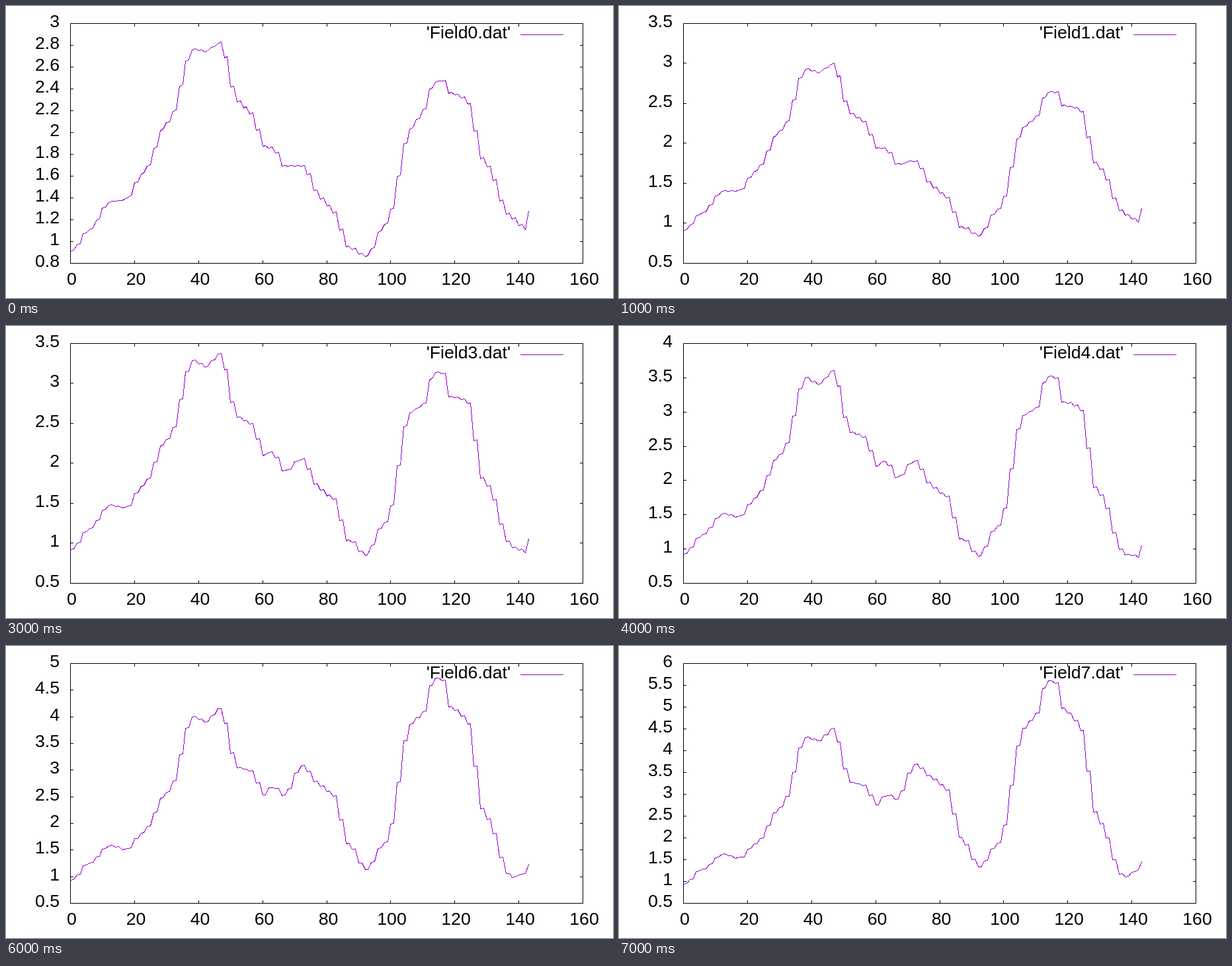
These frames come from a looping animation (918 px wide and 442 px high, 8000 ms). An HTML page:

```html
<!DOCTYPE html>
<html lang="en">
<head>
<meta charset="utf-8">
<title>Field plot</title>
<style>
html, body { margin: 0; width: 100%; height: 100%; overflow: hidden; background: #fff; }
svg { display: block; }
path { fill: none; stroke: #000; shape-rendering: crispEdges; }
.curve { stroke: #9400d3; }
text { font: 26.67px "Liberation Sans", Arial, sans-serif; fill: #000; }
.end { text-anchor: end; }
.mid { text-anchor: middle; }
</style>
</head>
<body>
<svg id="plot" width="918" height="442" viewBox="0 0 918 442"></svg>
<script>
const STEP = 1000, STEPS = 8, LAST = STEPS - 1;
const SAMPLES = 144;
const BOX = { left: 97, right: 872, top: 26, bottom: 389 };

// Plateaus of the profile: x, level at the first step, level at the last
const KEYS = [
  [0, .91, .94], [5, 1.09, 1.26], [12, 1.36, 1.62], [17, 1.38, 1.52],
  [22, 1.62, 1.86], [30, 2.09, 2.7], [38, 2.76, 4.31], [42, 2.74, 4.22],
  [46, 2.82, 4.5], [52, 2.28, 3.27], [56, 2.17, 3.2], [60, 1.87, 2.75],
  [63, 1.85, 3], [66, 1.69, 2.88], [72, 1.69, 3.68], [78, 1.39, 3.34],
  [82, 1.26, 3.09], [86, .95, 2.01], [92, .86, 1.33], [98, 1.16, 1.88],
  [106, 2.03, 4.51], [110, 2.21, 4.86], [113, 2.46, 5.62], [116, 2.47, 5.55],
  [118, 2.36, 4.97], [123, 2.31, 4.65], [129, 1.71, 2.4], [137, 1.22, 1.09],
  [142, 1.11, 1.28]
];

// Where growth lags behind a straight line: centre, height, width
const BUMPS = [[44, .17, 9], [77, .56, 9.5], [115, .67, 10], [146, .33, 7]];

const mix = (a, b, u) => a + (b - a) * u;
const stair = u => u - 0.6 * Math.sin(2 * Math.PI * u) / (2 * Math.PI);
const lag = x => BUMPS.reduce((sum, [c, h, w]) => sum + h * Math.exp(-((x - c) ** 2) / (2 * w * w)), 0);
const bend = t => t * (LAST - t) * (1 + 0.13 * t) / 16.5;

function level(x, t) {
  const i = Math.max(1, KEYS.findIndex(k => k[0] >= x));
  const [x0, a0, b0] = KEYS[i - 1], [x1, a1, b1] = KEYS[i];
  const u = stair((x - x0) / (x1 - x0));
  return mix(mix(a0, a1, u), mix(b0, b1, u), t / LAST) - lag(x) * bend(t);
}

// Samples come in near-equal pairs; the very last one jumps up
function sample(x, t) {
  const rise = x === SAMPLES - 1 ? 0.17 : x % 2 * 0.01;
  return level(x - x % 2, t) + rise;
}

// Round the y range outwards to whole ticks
function axis(values) {
  const low = Math.min(...values), high = Math.max(...values);
  const gap = high - low < 2 ? 0.2 : 0.5;
  return { min: Math.floor(low / gap) * gap, max: Math.ceil(high / gap) * gap, gap };
}

const px = x => Math.round(BOX.left + x * (BOX.right - BOX.left) / 160) + 0.5;
const label = (x, y, s, cls) => `<text x="${x}" y="${y}" class="${cls}">${s}</text>`;
const path = (d, cls = "") => `<path class="${cls}" d="${d}"/>`;

function draw(t) {
  const { left, right, top, bottom } = BOX;
  const values = Array.from({ length: SAMPLES }, (_, x) => sample(x, t));
  const { min, max, gap } = axis(values);
  const py = v => bottom - Math.round((v - min) * (bottom - top) / (max - min)) + 0.5;
  let lines = `M${left + .5} ${top + .5}H${right + .5}V${bottom + .5}H${left + .5}Z`;
  let labels = "";

  for (let x = 0; x <= 160; x += 20) {
    lines += `M${px(x)} ${bottom}v-4M${px(x)} ${top + 1}v4`;
    labels += label(px(x) + 2, 421.5, x, "mid");
  }
  const count = Math.round((max - min) / gap);
  for (let i = 0; i <= count; i++) {
    const v = min + i * gap, y = py(v);
    lines += `M${left + 1} ${y}h4M${right} ${y}h-4`;
    labels += label(81, y + 5.5, +v.toFixed(1), "end");
  }
  labels += label(763, 49, `'Field${t}.dat'`, "end");

  const curve = "M" + values.map((v, x) => `${px(x)} ${py(v)}`).join("L");
  return path(lines) + labels + path("M778 43.5H843", "curve") + path(curve, "curve");
}

const plot = document.getElementById("plot");
let shown = -1;
function tick() {
  const t = Math.floor(performance.now() / STEP) % STEPS;
  if (t !== shown) plot.innerHTML = draw(shown = t);
  requestAnimationFrame(tick);
}
tick();
</script>
</body>
</html>
```
